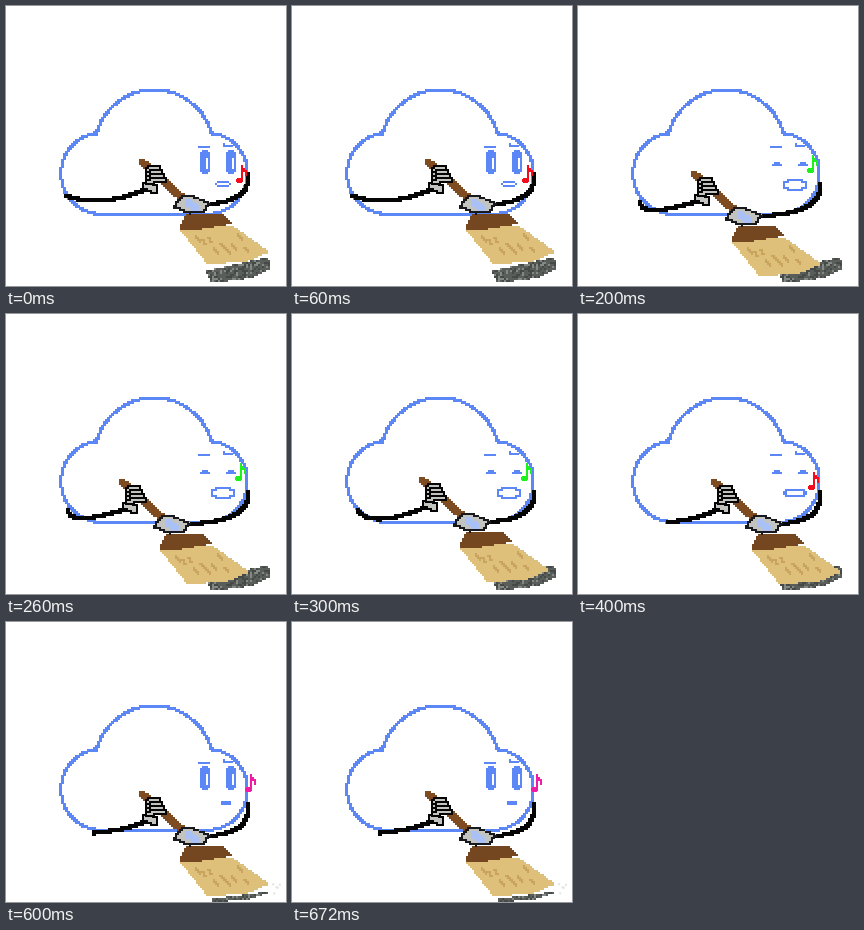
Write an HTML page with a canvas that moves like this. It is 280 px wide and 280 px high and loops after 0.72 s.

```html
<!DOCTYPE html>
<html>
<head>
<meta charset="utf-8">
<style>
html, body { margin: 0; width: 100%; height: 100%; overflow: hidden; background: #fff; }
canvas { display: block; }
</style>
</head>
<body>
<canvas id="stage" width="280" height="280"></canvas>
<script>
const ctx = document.getElementById('stage').getContext('2d');
const { PI, sin, cos, round, floor, min, max } = Math;
const BLUE = '#5c87f6', BLACK = '#050505', GREY = '#c3c4c0';
const RED = '#f50c1c', GREEN = '#1df01d', PINK = '#f01ca8';
const CELL = 2;
const snap = v => round(v / CELL) * CELL;
const noise = (x, y) => { const n = sin(x * 12.9898 + y * 78.233) * 43758.5453; return n - floor(n); };

function rect(x, y, w, h, color) {
  ctx.fillStyle = color;
  ctx.fillRect(x, y, w, h);
}

// Paths are functions of t from 0 to 1.
const oval = (cx, cy, rx, ry, from = 0, to = 2 * PI) => t => {
  const a = from + (to - from) * t;
  return [cx + rx * cos(a), cy + ry * sin(a)];
};
const curve = (a, b, c) => t =>
  [0, 1].map(i => a[i] * (1 - t) ** 2 + 2 * b[i] * t * (1 - t) + c[i] * t * t);
const line = (a, b) => t => [0, 1].map(i => a[i] + (b[i] - a[i]) * t);

// Stamps square dots along a path.
function stroke(path, color, size = 2) {
  for (let i = 0; i <= 150; i++) {
    const [x, y] = path(i / 150).map(snap);
    rect(x - (size >> 1), y - (size >> 1), size, size, color);
  }
}

function outline(points, color) {
  points.forEach((p, i) => stroke(line(p, points[(i + 1) % points.length]), color));
}

// Fills a convex clockwise polygon with cells.
function fill(points, color) {
  const inside = (x, y) => points.every(([ax, ay], i) => {
    const [bx, by] = points[(i + 1) % points.length];
    return (bx - ax) * (y - ay) >= (by - ay) * (x - ax);
  });
  const xs = points.map(p => p[0]), ys = points.map(p => p[1]);
  for (let y = snap(min(...ys)); y < max(...ys); y += CELL) {
    for (let x = snap(min(...xs)); x < max(...xs); x += CELL) {
      if (inside(x + 1, y + 1)) rect(x, y, CELL, CELL, color(x, y));
    }
  }
}

function cloud() {
  stroke(oval(94.5, 167, 40, 40.5, PI / 2, 1.5 * PI - .12), BLUE, 3);
  stroke(oval(147.5, 143, 59.5, 60, PI + .26, 2 * PI - .26), BLUE, 3);
  stroke(oval(201, 167, 40, 40.5, -PI / 2 + .12, PI / 2), BLUE, 3);
  stroke(line([92, 208], [202, 208]), BLUE, 3);
}

function face(eyes, mouth) {
  rect(192, 140, 12, 2, BLUE);
  stroke(curve([217, 137], [220, 143], [229, 138]), BLUE);
  for (const x of [194, 220]) {
    if (eyes === 'open') {
      rect(x + 2, 144, 6, 24, BLUE);
      rect(x, 146, 10, 20, BLUE);
      rect(x + 6, 152, 2, 11, '#fff');
    } else if (eyes === 'round') {
      rect(x + 2, 152, 7, 12, BLUE);
      rect(x, 154, 11, 8, BLUE);
    } else {
      rect(x + 2, 156, 6, 2, BLUE);
      rect(x, 158, 10, 2, BLUE);
    }
  }
  stroke(oval(...mouth), BLUE);
}

function note(x, y, color) {
  rect(x + 5, y, 2, 17, color);
  rect(x + 7, y + 3, 2, 4, color);
  rect(x + 9, y + 5, 2, 6, color);
  rect(x + 1, y + 13, 5, 5, color);
  rect(x, y + 14, 7, 3, color);
}

const soot = (x, y) => noise(x, y) < .18 ? '#858985' : noise(y, x) < .4 ? '#454a47' : '#595e5b';

function dust(swept) {
  if (!swept) return fill([[200, 265], [262, 251], [265, 262], [246, 272], [206, 277]], soot);
  fill([[205, 277], [268, 269], [240, 278], [205, 280]], soot);
  for (let i = 0; i < 5; i++) rect(264 + 12 * noise(i, 1), 261 + 10 * noise(i, 2), 2, 2, '#e3e3e3');
}

function fist() {
  for (const [color, grow] of [[BLACK, 4], [GREY, 0]]) {
    stroke(line([139, 179], [148, 183]), color, 4 + grow);
  }
  for (let i = 0; i < 4; i++) {
    const finger = line([141, 164 + 4 * i], [151 + 2 * i, 161 + 4 * i]);
    stroke(finger, BLACK, 6);
    stroke(finger, GREY, 2);
  }
}

function palm() {
  const shape = [[176, 190], [188, 191], [203, 197], [198, 205], [184, 207], [168, 201]];
  fill(shape, () => GREY);
  stroke(line([181, 196], [189, 202]), '#a9c1f7', 6);
  outline(shape, '#17191c');
}

function broom() {
  stroke(line([136, 156], [182, 197]), '#7f4c22', 6);
  fill([[174, 224], [226, 219], [264, 246], [240, 256], [201, 258]], () => '#dfc07a');
  for (let i = 0; i < 9; i++) {
    const x = 190 + 6 * i, y = 226 + 18 * noise(i, 3);
    stroke(line([x, y], [x + 4, y + 5]), '#c9a45e');
  }
  fill([[180, 207], [217, 208], [226, 218], [190, 224], [173, 223]], () => '#744720');
  fist();
  palm();
}

const idle = { eyes: 'open', mouth: [217, 178, 7, 2], note: [230, 159, RED],
  broom: [0, 0], shoulder: [59, 189], elbow: [95, 203] };
const sing = { eyes: 'shut', mouth: [217, 179, 11, 5], note: [229, 149, GREEN] };
const rest = { eyes: 'shut', mouth: [217, 179, 11, 4], note: [230, 158, RED],
  broom: [0, 12], shoulder: [90, 208], elbow: [120, 206] };
const poses = [
  idle,
  { ...idle, eyes: 'round' },
  { ...sing, broom: [-20, 12], shoulder: [62, 195], elbow: [62, 213] },
  { ...sing, broom: [-6, 10], shoulder: [65, 195], elbow: [78, 216] },
  rest,
  { ...rest, eyes: 'open' },
  { eyes: 'open', mouth: [220, 181, 4, 2], note: [239, 152, PINK],
    broom: [0, 16], shoulder: [88, 211], elbow: [122, 208], swept: true }
];

function draw(pose) {
  const [dx, dy] = pose.broom;
  rect(0, 0, 280, 280, '#fff');
  cloud();
  face(pose.eyes, pose.mouth);
  // Both arms reach for the broom.
  stroke(curve(pose.shoulder, pose.elbow, [140 + dx, 183 + dy]), BLACK, 4);
  stroke(curve([242, 168 + .9 * dy], [245, 196 + dy], [200 + dx, 198 + dy]), BLACK, 4);
  note(...pose.note);
  dust(pose.swept);
  ctx.save();
  ctx.translate(dx, dy);
  broom();
  ctx.restore();
}

const start = performance.now();
let shown = -1;
function tick() {
  const step = min(6, floor((performance.now() - start) % 720 / 100));
  if (step !== shown) draw(poses[shown = step]);
  requestAnimationFrame(tick);
}
tick();
</script>
</body>
</html>
```
